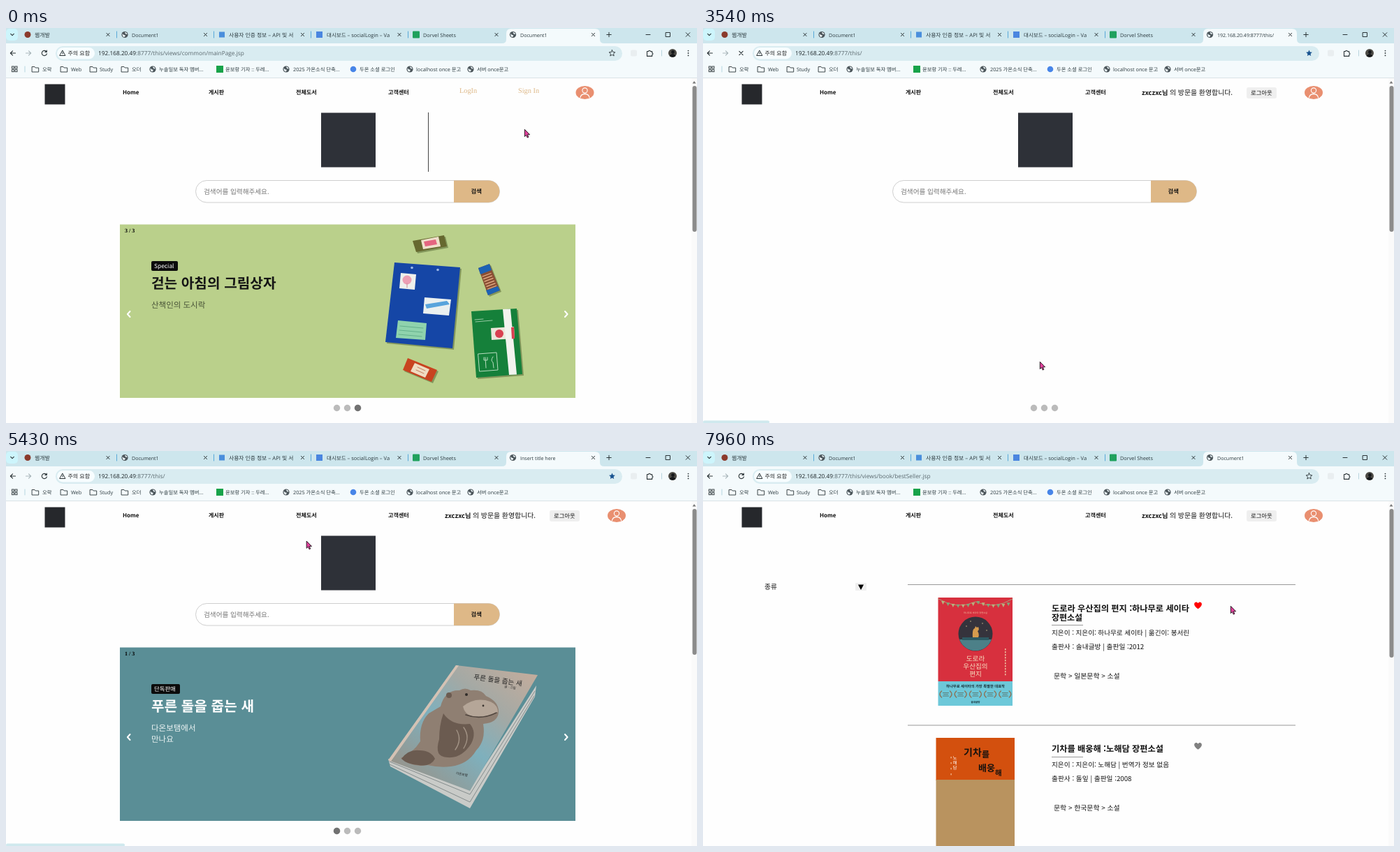
An HTML page for the animation above (8000 ms loop, 989 by 566 pixels).

```html
<!DOCTYPE html>
<html lang="ko">
<head>
<meta charset="utf-8">
<title>Document1</title>
<style>
html, body { margin: 0; width: 100%; height: 100%; overflow: hidden; background: #fefefe; }
svg { display: block; }
text { font-family: "Open Sans", "Noto Sans CJK KR", "Noto Sans CJK", sans-serif; text-rendering: geometricPrecision; white-space: pre; }
.page text { font-family: "Noto Sans CJK KR", "Noto Sans CJK", "Noto Sans", sans-serif; }
.page .serif { font-family: "Liberation Serif", serif; }
.line { fill: none; stroke: #2b3437; stroke-linecap: round; stroke-linejoin: round; }
</style>
</head>
<body>
<svg id="stage" width="989" height="566" viewBox="0 0 989 566"></svg>
<script>
const LOOP = 8000;

// Drawing helpers: each returns SVG markup
const attrs = o => Object.entries(o).map(([k, v]) => ` ${k}="${v}"`).join('');
const text = (x, y, size, s, o = {}) => `<text x="${x}" y="${y}" font-size="${size}"${attrs(o)}>${s}</text>`;
const bold = (x, y, size, s, fill = '#111') => text(x, y, size, s, { 'font-weight': 700, fill });
const rect = (x, y, w, h, fill, r = 0, o = {}) =>
  `<rect x="${x}" y="${y}" width="${w}" height="${h}" rx="${r}" fill="${fill}"${attrs(o)}/>`;
const dot = (x, y, r, fill, o = {}) => `<circle cx="${x}" cy="${y}" r="${r}" fill="${fill}"${attrs(o)}/>`;
const poly = (points, fill, o = {}) => `<polygon points="${points}" fill="${fill}"${attrs(o)}/>`;
const shape = (d, fill) => `<path d="${d}" fill="${fill}"/>`;
const line = (d, w = 1, stroke = '#2b3437') => `<path class="line" d="${d}" stroke-width="${w}" style="stroke:${stroke}"/>`;
const group = (id, body, o = {}) => `<g id="${id}"${attrs(o)}>${body}</g>`;
const cross = (x, y, r, w = 1) => line(`M${x - r} ${y - r}l${2 * r} ${2 * r}m0 ${-2 * r}l${-2 * r} ${2 * r}`, w);
const globe = (x, y) => dot(x, y, 4.6, '#4c565b') +
  shape(`M${x - 3.4} ${y - 1.6}q2 2.6 4 2.2q.6 2-1.4 3q-2.8-.6-2.6-5.2zM${x} ${y - 3.6}q3.2.4 3.4 3q-2.6.4-3.4-3z`, '#eef7fa');
const folder = x => line(`M${x - 4.5} 55.5h3.5l1.2 1.5h4.5v6h-9.2z`, .9);

const STRIP = '#cde6ed', BAR = '#f4fafc', TAN = '#deb887', RUST = '#bb713b';

function browser() {
  let s = rect(0, 0, 989, 22, STRIP) + rect(0, 22, 989, 50, BAR) + rect(0, 71, 989, 1, '#dae3e6');
  s += rect(0, 1, 17, 17, '#cdf5fc', 5) + line('M6.7 8.3l2.3 2.3l2.3-2.3', 1.1);
  s += shape('M710 22q6 0 6-6v-8q0-7 7-7h120q7 0 7 7v8q0 6 6 6z', BAR);
  for (const x of [158.5, 297.5, 436.5, 575.5]) s += line(`M${x} 5v9`, 1, '#58a9d8');
  for (const x of [146, 285.5, 424.5, 563, 702, 840.5]) s += cross(x, 9.5, 2.1);
  s += dot(31, 9.5, 4.5, '#8b3a2c') + globe(170, 9.5) + rect(305, 5.5, 8, 8, '#4a8fdc') +
    rect(444, 5, 9, 9, '#4a86e0') + rect(582, 4.5, 10, 10, '#1fa15d', 1);
  const ink = { fill: '#2c3a3f' };
  s += text(41, 13, 7.9, '웹개발', ink) + text(180, 13, 7.1, 'Document1', ink) +
    text(319, 13, 7.8, '사용자 인증 정보 – API 및 서', ink) +
    text(459, 13, 7.5, '대시보드 – socialLogin – Va', ink) + text(597, 13, 7.3, 'Dorvel Sheets', ink);
  s += group('tabGlobe', globe(725.5, 9.5)) +
    group('spinner', line('M724.5 5.3h1', 1.1, '#6b7d88'));
  s += group('titleDoc', text(736, 13, 7.1, 'Document1', ink)) +
    group('titleHost', text(736, 13, 7.05, '192.168.20.49:8777/this/', ink)) +
    group('titlePath', text(736, 13, 7.05, '192.168.20.49:8777/this/view', ink)) +
    group('titleInsert', text(736, 13, 7.1, 'Insert title here', ink));
  s += line('M859.8 9.5h6.4m-3.2-3.2v6.4') + line('M916 9.5h6') + line('M944.5 6.5h6v6h-6z') + cross(976, 9.5, 2.8);

  // Toolbar
  s += line('M13.5 36h-7m3-3.2l-3.2 3.2l3.2 3.2', 1.1) + line('M28.5 36h7m-3-3.2l3.2 3.2l-3.2 3.2', 1.1, '#a9b6bb');
  s += group('reload', line('M57.6 33.6a3.6 3.6 0 1 0 .8 3.2M58.3 32v2.4h-2.4', 1.1)) + group('stop', cross(54.5, 36, 2.6, 1.1));
  s += rect(71, 26, 811, 21, '#d9ecf1', 10.5) + rect(73, 28, 54, 16.5, '#f7fdff', 8.2);
  s += line('M81 32.3l3.9 7.2h-7.8zM81 35v2', 1) + text(88.5, 39, 8, '주의 요함', { fill: '#222' });
  const url = (id, path) => group(id,
    text(132, 39, 8.3, `<tspan fill="#1d2528">192.168.20.49</tspan>${path}`, { fill: '#5a686e' }));
  s += url('urlMain', ':8777/this/views/common/mainPage.jsp') + url('urlLogin', ':8777/this/views/member/loginform.jsp') +
    url('urlRoot', ':8777/this/') + url('urlBest', ':8777/this/views/book/bestSeller.jsp');
  const star = 'M867.5 31.6l1.3 2.9l3.1.3l-2.4 2.1l.7 3.1l-2.7-1.6l-2.7 1.6l.7-3.1l-2.4-2.1l3.1-.3z';
  s += group('starOff', line(star, .9)) + group('starOn', shape(star, '#17528f'));
  s += rect(894, 31.5, 9, 9, '#e9eef0', 2) + line('M917.5 33.5h2.2a1.3 1.3 0 0 1 2.6 0h2.4v2.3a1.2 1.2 0 0 1 0 2.4v2.2h-7.2z', 1.1);
  s += line('M938.5 32v8', 1, '#b9d5de') + dot(954, 36, 6, '#4c4a45') + dot(954.5, 34.5, 2.4, '#15171a') +
    shape('M949.8 40q4.2-6 8.6 0a6 6 0 0 1-8.6 0z', '#15171a');
  for (const y of [32.6, 36, 39.4]) s += dot(976.5, y, .9, '#2b3437');

  // Bookmarks
  for (const x of [8.5, 13]) for (const y of [55, 59.7]) s += rect(x, y, 3, 3, 'none', 0, { stroke: '#2b3437', 'stroke-width': .9 });
  s += line('M27 55v8', 1, '#b5d6e0');
  for (const x of [42, 83, 125, 170]) s += folder(x);
  for (const x of [210, 401, 578, 665]) s += globe(x, 59);
  s += rect(301, 54, 10, 10, '#17a34a') + dot(497, 59, 4.3, '#4785e8');
  const marks = [[52, '오락'], [93, 'Web'], [134, 'Study'], [180, '오더'], [219, '누솔일보 독자 멤버...'], [314, '윤보랑 기자 :: 두레...'],
    [411, '2025 가온소식 단축...'], [506, '두온 소셜 로그인'], [587, 'localhost once 문고'], [674, '서버 once문고']];
  for (const [x, label] of marks) s += text(x, 62, 7.3, label, ink);
  return s;
}

function header() {
  const person = (id, x) => group(id, `<ellipse cx="${x}" cy="92.5" rx="13" ry="9.6" fill="#e98f70"/>` +
    line(`M${x - 6.5} 99.6q.8-5 6.5-5t6.5 5`, 1.1, '#fff') + dot(x, 89.5, 3.6, 'none', { stroke: '#fff', 'stroke-width': 1.1 }));
  let s = rect(55.5, 80.5, 29, 29, '#26282c');
  s += bold(167, 95, 8, 'Home') + bold(290, 95, 8, '게시판') + bold(415, 95, 8.1, '전체도서') + bold(547, 95, 8.1, '고객센터');
  s += group('guest', text(649, 93, 10.3, 'LogIn', { id: 'logIn', class: 'serif', fill: TAN }) +
    text(733, 93, 10.3, 'Sign In', { class: 'serif', fill: TAN }) + person('guestIcon', 828.5));
  s += group('member', bold(628, 95.5, 9.2, 'zxczxc님') + text(668, 95.5, 9.9, '의 방문을 환영합니다.', { fill: '#111' }) +
    rect(778, 85, 43, 16, '#efefef', 3) + text(784, 95.5, 8.3, '로그아웃', { fill: '#111' }) + person('memberIcon', 874));
  return group('nav', s);
}

function search() {
  return rect(451, 121.5, 78, 78, '#2e3138') +
    group('caret', rect(604, 121, 1, 85, '#444')) +
    rect(271.5, 218.5, 435, 31.5, '#fff', 15.7, { stroke: '#cfcfcf' }) +
    shape('M641 218.5h49.7a15.7 15.7 0 0 1 0 31.4h-49.7z', TAN) +
    text(283, 238, 9.6, '검색어를 입력해주세요.', { fill: '#757575' }) +
    bold(665.5, 237, 8.3, '검색') +
    [473.5, 488.5, 503.5].map(x => dot(x, 544.5, 4.7, '#bbb')).join('');
}

function slide(bg, num, badge, badgeW, title, ink, subs, subInk, art) {
  return rect(163, 281.5, 652, 248.5, bg) + text(170, 292.5, 8, `${num} / 3`, { class: 'serif', 'font-weight': 700 }) +
    rect(208, 334, badgeW, 14, '#0b0b0b', 2) + text(212, 344, 8.4, badge, { fill: '#fff', 'font-weight': 500 }) +
    bold(208, 373, 20.2, title, ink) +
    subs.map((s, i) => text(208, 401 + 16 * i, 11.5, s, { fill: subInk })).join('') + art +
    line('M177.5 406l-3.6 4l3.6 4', 2, '#fff') + line('M800 406l3.6 4l-3.6 4', 2, '#fff') +
    dot(473.5 + 15 * (num - 1), 544.5, 4.7, '#717171');
}

function goods() {
  const shade = pts => poly(pts, '#6d7f48', { transform: 'translate(2 2)', opacity: .7 });
  const bag = '556,336 650,343 639,459 543,450', book = '666,406 731,402 739,496 673,501';
  const clip = '582,305 627,297 631,313 587,321', stamp = '575,473 617,490 609,507 568,490', pad = '676,344 692,338 707,376 690,383';
  let s = [bag, book, clip, stamp, pad].map(shade).join('');
  s += poly(bag, '#1546a6') + dot(581, 343.5, 1.8, '#9db8e8') + dot(618, 346.5, 1.8, '#9db8e8');
  s += poly('565,351 587,353 585,375 563,373', '#eef0ec') + dot(574, 361, 6.5, '#ec9fb4') + line('M574 366v6', 1, '#c58a96');
  s += poly('599,386 637,389 634,412 597,409', '#eaf0f0') + poly('600,396 631,391 635,396 602,402', '#58a4dc');
  s += poly('561,419 602,423 600,447 558,444', '#8fd3ad') + line('M564 427l33 3m-34 3l33 3m-34 3l33 3', .8, '#5aa783');
  s += poly(clip, '#66682f') + poly('594,304 619,299 622,313 597,317', '#efe0cb') + poly('598,306 615,303 617,310 600,313', '#e46580');
  s += poly(pad, '#8a4f34') + poly('676,344 692,338 695,347 679,353', '#1d62b4') + poly('687,376 704,370 707,376 690,383', '#1d62b4');
  for (let i = 0; i < 6; i++) s += line(`M${682 + i * 1.5} ${356 + i * 3.6}l12-4.5`, 1.3, '#e6b089');
  s += poly(book, '#15803a') + poly('694,430 727,428 728,445 695,447', '#ece6da') + dot(706, 438, 6, '#d84050');
  s += poly('711,403 722,402.5 731,496.5 720,497', '#f2f3ee') + poly('723,429 727,428.5 728,445 724,445.5', '#d84050');
  s += line('M671 418l12-1m-11 4l24-2', .8, '#b9dcbf') + line('M676 467l26-2l2 25l-26 2zM686 472l1 15m-3-15v4h5v-4m8-1q-4 6 0 8l1 8', 1, '#b9dcbf');
  s += poly(stamp, '#c8431f') + poly('585,480 606,489 600,501 579,492', '#efdcc2') + line('M589 486l11 5m-13-1l11 5', 1, '#c57c5c');
  return s;
}

function novel() {
  const fur = '#8f7f72', dark = '#6b5b50', light = '#b5a698';
  return poly('547,441 664,484 759,336 757,352 664,512 550,452', '#c9cbc8') +
    line('M549 445l115 47l93-148M549 449l115 54l92-152', 1, '#858d8d') +
    poly('644,307 761,321 664,487 547,443', 'url(#cover)') +
    poly('644,307 648,307.5 551,444.5 547,443', '#d4c2b4') +
    shape('M622 366q6-24 27-23q8-5 16 0q16-2 22 8q18 8 18 22q0 16-22 18q4 24-10 38q-12 20-36 23q-16 2-34-2q-22 4-38-10q18-8 28-24q-2-26 12-40z', fur) +
    shape('M626 376q12 18 38 15q10 12 2 28q-14 22-34 20q-20 0-12-26q0-20 6-37z', dark) +
    shape('M654 366q14-12 32-9q18 4 18 17q-20 12-38 6q-10-4-12-14z', light) +
    shape('M566 441q10-14 26-12q16 0 22 12q-6 12-24 9q-16-1-24-9z', dark) +
    line('M658 378q22 8 44-3', 1.6, '#51463f') + dot(659, 349, 2, '#302c29') + dot(683, 365, 1.4, '#3b3530') +
    dot(634, 350, 4, dark) + line('M645 400q8 14-2 28m12-32q10 14 0 30', 1.4, '#a39486') +
    text(669, 327, 9.6, '푸른 돌을 줍는 새', { fill: '#222', transform: 'rotate(8 669 327)' }) +
    text(713, 339, 4.6, '글 · 그림', { fill: '#222', transform: 'rotate(8 713 339)' }) +
    text(644, 463, 4.5, '다온보탬', { fill: '#222', transform: 'rotate(12 644 463)' });
}

function login() {
  const field = (y, hint) => rect(303, y, 336, 32, '#fff', 16, { stroke: '#c98755' }) +
    text(315, y + 19.5, 8.05, hint, { fill: '#757575' });
  const badge = (x, fill) => dot(x + 1.5, 475, 12.8, '#777', { opacity: .55, filter: 'url(#soft)' }) + dot(x, 473, 12.4, fill);
  return rect(271.5, 201.5, 435, 400, '#fefefe', 13, { stroke: '#222' }) +
    bold(461, 281, 19.5, '로그인', '#b9703c') +
    text(302, 309, 9.2, 'ID', { 'font-weight': 500 }) + field(323.5, '아이디를 입력하세요요.') +
    text(302, 377, 8.9, 'Password', { 'font-weight': 500 }) + field(392.5, '비밀번호를 입력하세요.') +
    rect(367.5, 432.5, 7.5, 7.5, '#fff', 1.5, { stroke: '#666', 'stroke-width': .9 }) +
    bold(379, 441, 8.6, '로그인 정보 저장') + bold(533, 438, 8.5, '아이디 / 비밀번호 찾기') +
    badge(429, '#0b860b') + badge(478, '#fdf100') + badge(527, '#fff') + dot(527, 473, 5, '#4285f4') +
    rect(349, 519, 280, 31, RUST, 15.5) + text(470, 538, 12.6, '로그인', { fill: '#fff', 'letter-spacing': .4 });
}

const heart = (id, x, y, fill) => `<g transform="translate(${x} ${y})"><path id="${id}" fill="${fill}" d="M0 5C-3 2.6-5.4.6-5.4-1.9C-5.4-5-1.4-5.9 0-3C1.4-5.9 5.4-5 5.4-1.9C5.4.6 3 2.6 0 5z"/></g>`;

function firstCover() {
  const mid = (y, size, s, fill, weight = 400) => text(390, y, size, s, { fill, 'font-weight': weight, 'text-anchor': 'middle' });
  let s = rect(336.5, 210, 106.5, 120, '#d7303e') + rect(336.5, 330, 106.5, 35, '#6dc8d9');
  s += line('M337 212q27 16 53 4q26 12 53-4', .8, '#9db58a');
  for (let i = 0; i < 14; i++) {
    const x = 341 + i * 7.2, y = 215 + 5 * Math.abs(Math.sin(i * Math.PI / 7));
    s += poly(`${x},${y} ${x + 5},${y} ${x + 2.5},${y + 5}`, i % 2 ? '#82a67c' : '#b8b17d');
  }
  s += mid(233, 3.2, '하나무로 세이타 장편소설', '#f0c9a8') + dot(390, 262, 24.5, '#35333c') +
    shape('M367 270h46a24.5 24.5 0 0 1-46 0z', '#4c8088') + rect(371, 267, 38, 4, '#2d5a63') +
    shape('M386 267q-1-12 3-13l1-3l2 2l2-1q2 5-1 6q3 5 1 9z', '#d59b4e');
  for (const [x, y] of [[377, 251], [400, 247], [406, 257], [383, 244]]) s += dot(x, y, .7, '#e8d69c');
  s += mid(301, 9.6, '도로라', '#f6dfc0') + mid(312, 9.6, '우산집의', '#f6dfc0') + mid(323, 9.6, '편지', '#f6dfc0');
  for (let i = 0; i < 10; i++) s += rect(432, 283 + i * 4, 1.5, 2.4, '#edbfa0');
  s += mid(338.5, 5.3, '하나무로 세이타의 가장 특별한 대표작', '#173038', 700);
  for (let i = 0; i < 5; i++) {
    const x = 347.5 + i * 21.2;
    s += line(`M${x - 6} 344q-5 4.5 0 9m12-9q5 4.5 0 9`, 1.5, '#8c7358') + line(`M${x - 4} 346.5h8m-7 2.3h6m-7 2.3h8`, .8, '#5b6c62');
  }
  return s + mid(361, 3.6, '솔내글방', '#173038', 700);
}

function secondCover() {
  let s = rect(333.5, 411, 112.5, 61, '#d3500e') + rect(333.5, 471, 112.5, 95, '#b9935f');
  s += bold(373, 437, 14, '기차', '#17120e') + bold(399, 439, 12, '를', '#17120e');
  s += bold(394, 459, 13, '배웅', '#17120e') + bold(418, 465, 10.5, '해', '#17120e');
  [...'노해담'].forEach((c, i) => s += text(357.5, 442 + i * 7, 6.5, c, { fill: '#fff' }));
  for (let i = 0; i < 4; i++) s += rect(354.5, 438 + i * 8, 1.2, 2.4, '#f4c49f');
  return s;
}

function list() {
  const row = (x, y, size, s) => text(x, y, size, s, { fill: '#111' });
  const rule = (x, y, w) => rect(x, y, w, 1, '#999');
  return row(88, 198, 9.7, '종류') + rect(218, 189, 16, 11, '#efefef', 1) + poly('222,191.5 230,191.5 226,199', '#000') +
    rule(293, 191, 555) + firstCover() +
    bold(499, 230, 12.2, '도로라 우산집의 편지 :하나무로 세이타') + bold(499, 242.5, 12, '장편소설') + rule(499, 249, 45) +
    row(499, 264, 9.6, '지은이 : 지은이: 하나무로 세이타 | 옮긴이: 봉서린') +
    row(499, 284, 9.7, '출판사 : 솔내글방 | 출판일 :2012') + row(502, 326, 9.9, '문학 &gt; 일본문학 &gt; 소설') +
    heart('like', 708.5, 221.3, '#808080') +
    rule(293, 392.5, 555) + secondCover() +
    bold(499, 431, 12.2, '기차를 배웅해 :노해담 장편소설') + rule(499, 438, 45) +
    row(499, 453, 9.6, '지은이 : 지은이: 노해담 | 번역가 정보 없음') +
    row(499, 472.5, 9.7, '출판사 : 돌잎 | 출판일 :2008') + row(502, 514.5, 9.9, '문학 &gt; 한국문학 &gt; 소설') +
    heart('other', 708.5, 422.8, '#808080');
}

const stage = document.getElementById('stage');
stage.innerHTML = `<defs>
  <linearGradient id="cover" x1="0" y1="1" x2="1" y2="0"><stop offset="0" stop-color="#a08a7a"/><stop offset=".45" stop-color="#7eb0bd"/><stop offset=".68" stop-color="#a3a9a5"/><stop offset="1" stop-color="#c8ad9b"/></linearGradient>
  <filter id="soft" x="-30%" y="-30%" width="160%" height="160%"><feGaussianBlur stdDeviation="1.2"/></filter></defs>` +
  rect(0, 0, 989, 566, '#fefefe') + browser() +
  `<g class="page">` + header() + group('main', search()) +
  group('slide3', slide('#bad08b', 3, 'Special', 38, '걷는 아침의 그림상자', '#151515', ['산책인의 도시락'], '#485337', goods())) +
  group('slide1', slide('#5a8e96', 1, '단독판매', 41, '푸른 돌을 줍는 새', '#fff', ['다온보탬에서', '만나요'], '#edf4f4', novel())) +
  group('login', login()) + group('list', list()) + `</g>` +
  group('bar', rect(981, 72, 8, 494, '#fafafa') + poly('982.5,79.5 987.5,79.5 985,76', '#777') + rect(982.5, 83, 6, 209, '#8b8b8b', 3, { id: 'thumb' })) +
  rect(0, 562.5, 95, 4, '#cfe9ee', 2, { id: 'status' }) +
  group('arrow', `<path d="M.3.3V10.6L2.6 8.5L4.2 12.1L5.9 11.3L4.3 7.8H7.6z" fill="#e2409c" stroke="#1a1118" stroke-width=".9"/>`) +
  group('beam', line('M-3-5.5h2.2l.8.6l.8-.6h2.2M0-5v10M-3 5.5h2.2l.8-.6l.8.6h2.2', 1.5, '#222'));

const el = {};
stage.querySelectorAll('[id]').forEach(n => el[n.id] = n);

// When each part is visible, as [from, to) pairs
const OPEN_LOGIN = 1620, OPEN_HOME = 3390, HOME_READY = 3890, OPEN_LIST = 5680, LIST_READY = 5950;
const visible = {
  caret: [[0, 70]],
  main: [[0, OPEN_LOGIN], [OPEN_HOME, OPEN_LIST]],
  slide3: [[0, OPEN_LOGIN]],
  slide1: [[HOME_READY, OPEN_LIST]],
  login: [[OPEN_LOGIN, OPEN_HOME]],
  list: [[LIST_READY, LOOP]],
  guest: [[0, OPEN_HOME]],
  member: [[OPEN_HOME, LOOP]],
  bar: [[0, OPEN_LIST], [LIST_READY, LOOP]],
  urlMain: [[0, OPEN_LOGIN]],
  urlLogin: [[OPEN_LOGIN, OPEN_HOME]],
  urlRoot: [[OPEN_HOME, OPEN_LIST]],
  urlBest: [[OPEN_LIST, LOOP]],
  starOn: [[OPEN_HOME, OPEN_LIST]],
  starOff: [[0, OPEN_HOME], [OPEN_LIST, LOOP]],
  titleDoc: [[0, OPEN_HOME], [LIST_READY, LOOP]],
  titleHost: [[OPEN_HOME, HOME_READY]],
  titleInsert: [[HOME_READY, OPEN_LIST]],
  titlePath: [[OPEN_LIST, LIST_READY]],
  spinner: [[1460, OPEN_LOGIN], [3090, OPEN_HOME]],
  tabGlobe: [[0, 1460], [OPEN_LOGIN, 3090], [OPEN_HOME, LOOP]],
  stop: [[1460, 1780], [3090, HOME_READY], [OPEN_LIST, 6200]],
  reload: [[0, 1460], [1780, 3090], [HOME_READY, OPEN_LIST], [6200, LOOP]],
  status: [[OPEN_HOME, 3980], [5350, 6200]]
};

// Pointer path: time, x, y
const path = [[0, 742, 145], [590, 742, 145], [1330, 666, 92], [1900, 666, 92], [2200, 658, 133], [2540, 571.5, 334],
  [2980, 488, 479], [3090, 488, 479], [3250, 482, 478], [3920, 482, 478], [4300, 464, 300], [4610, 408, 122], [4690, 410, 141],
  [4770, 410, 141], [5080, 425, 86], [5520, 430, 134], [6350, 430, 134], [6760, 600, 220], [7000, 690, 237], [7150, 699, 228],
  [7340, 704, 222], [7959, 704, 222], [7960, 755, 222], [LOOP, 755, 222]];

// Rest at stops and jumps, otherwise carry speed through
function slope(i, k) {
  const a = path[i - 1], b = path[i], c = path[i + 1];
  if (!a || !c || c[0] - b[0] < 5 || b[0] - a[0] < 5) return 0;
  const still = (p, q) => p[1] === q[1] && p[2] === q[2];
  return still(a, b) || still(b, c) ? 0 : (c[k] - a[k]) / (c[0] - a[0]);
}

function pointer(t) {
  const i = path.findIndex((p, n) => n + 1 < path.length && t < path[n + 1][0]);
  const a = path[i], b = path[i + 1], d = b[0] - a[0], u = (t - a[0]) / d;
  if (d < 5) return [a[1], a[2]];
  const u2 = u * u, u3 = u2 * u;
  return [1, 2].map(k => (2 * u3 - 3 * u2 + 1) * a[k] + (u3 - 2 * u2 + u) * d * slope(i, k) +
    (3 * u2 - 2 * u3) * b[k] + (u3 - u2) * d * slope(i + 1, k));
}

const within = (t, spans) => spans.some(([a, b]) => t >= a && t < b);
const show = (node, on) => node.style.display = on ? '' : 'none';

function draw(t) {
  for (const id in visible) show(el[id], within(t, visible[id]));
  el.nav.setAttribute('transform', `translate(${within(t, [[OPEN_LIST, LIST_READY]]) ? 4.5 : 0} 0)`);
  el.thumb.setAttribute('height', within(t, visible.login) ? 350 : t >= LIST_READY ? 213 : 209);
  el.status.setAttribute('width', t < 5000 ? 95 : 170);
  el.spinner.setAttribute('transform', `rotate(${(t - 1540) * .45} 725.5 9.5)`);

  const [x, y] = pointer(t);
  const overLogIn = x > 648 && x < 675 && y > 84 && y < 98 && t < OPEN_HOME;
  el.logIn.setAttribute('fill', overLogIn ? '#f3dfbd' : TAN);
  const overField = within(t, visible.login) && x > 303 && x < 639 && (y > 324 && y < 356 || y > 393 && y < 425);
  show(el.arrow, !overField);
  show(el.beam, overField);
  for (const c of [el.arrow, el.beam]) c.setAttribute('transform', `translate(${x.toFixed(2)} ${y.toFixed(2)})`);

  const pulse = Math.min(1, Math.max(0, (t - 7490) / 320));
  el.like.setAttribute('transform', `scale(${1 + .3 * Math.sin(Math.PI * pulse)})`);
  el.like.setAttribute('fill', t < 7560 ? '#808080' : '#f00');
}

const start = performance.now();
function tick() {
  draw((performance.now() - start) % LOOP);
  requestAnimationFrame(tick);
}
tick();
</script>
</body>
</html>
```
